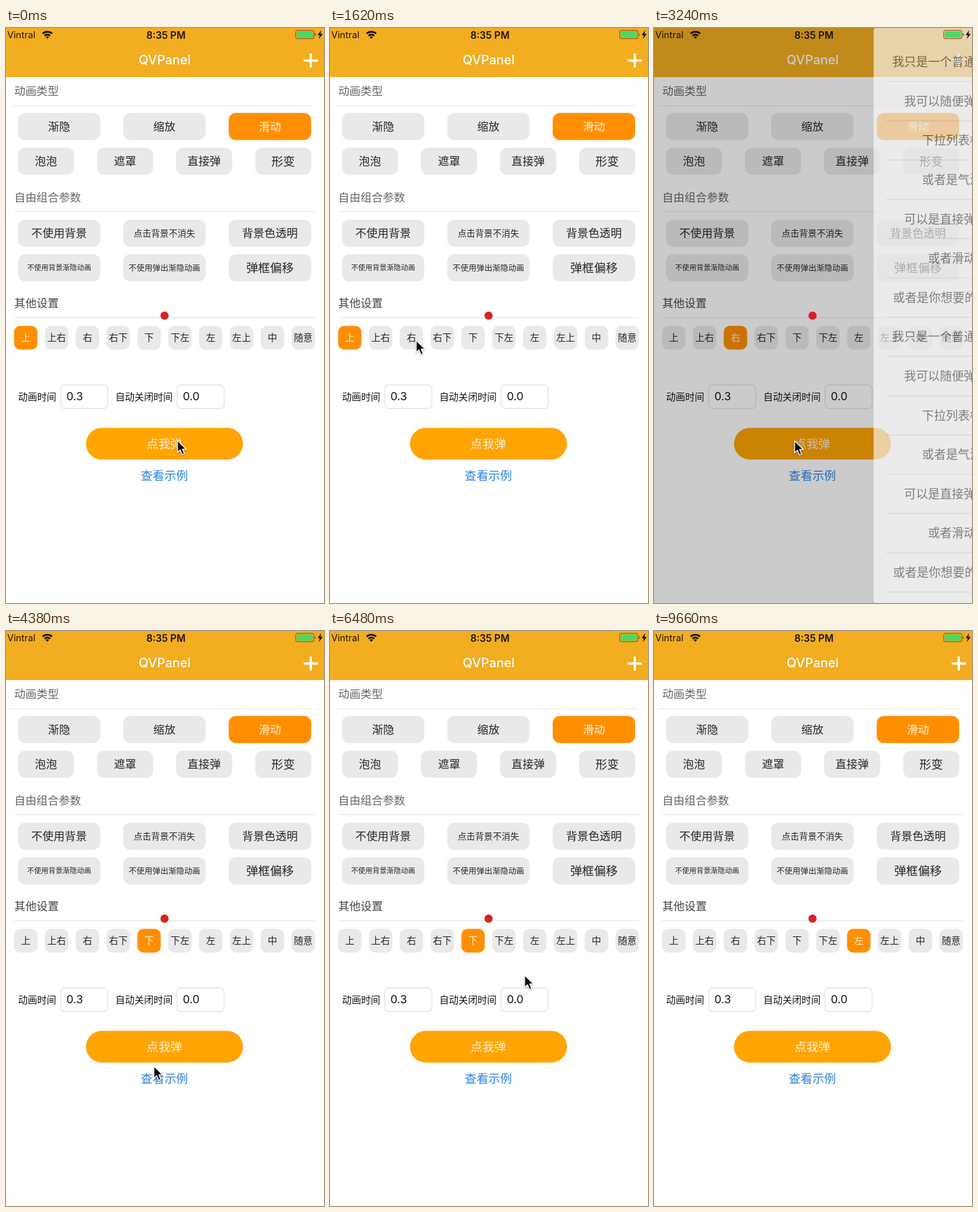
These frames come from a looping animation (500x902 px, 9720 ms). An HTML page:

```html
<!DOCTYPE html>
<html lang="zh-CN">
<head>
<meta charset="utf-8">
<title>Popup demo</title>
<style>
  html, body { margin: 0; width: 100%; height: 100%; overflow: hidden; background: #fff; }
  svg { display: block; width: 100vw; height: 100vh; }
  text { font-family: Inter, "Noto Sans CJK SC", "Noto Sans CJK", sans-serif; }
</style>
</head>
<body>
<svg id="stage" viewBox="0 0 500 902"></svg>
<script>
const LOOP = 9720, STEP = 60, W = 500, H = 902, SIDE = 246, ROW = 61.6;
const stage = document.getElementById('stage');

const rect = (x, y, w, h, r, fill, more = '') =>
  `<rect x="${x}" y="${y}" width="${w}" height="${h}" rx="${r}" fill="${fill}" ${more}/>`;
const label = (s, x, cy, size, fill, anchor = 'middle', more = '') =>
  `<text x="${x}" y="${cy + size * 0.37}" font-size="${size}" fill="${fill}" text-anchor="${anchor}" ${more}>${s}</text>`;
const rule = (x1, x2, y, color = '#e2e2e2') =>
  `<path d="M${x1} ${y}H${x2}" stroke="${color}" stroke-width="1.2"/>`;
const option = (s, x, y, w, size, on) =>
  rect(x, y, w, 42.6, 11.5, on ? '#ff8f00' : '#e9e9e9') +
  label(s, x + w / 2, y + 21.3, size, on ? '#fff1dc' : '#262626');
const field = (s, x) =>
  rect(x, 559.8, 74, 37, 6, '#fff', 'stroke="#dedede" stroke-width="1.2"') +
  label(s, x + 9, 578, 17.5, '#111', 'start');

const spots = ['上', '上右', '右', '右下', '下', '下左', '左', '左上', '中', '随意'];
const rows = ['我只是一个普通的列表', '我可以随便弹出来', '下拉列表框', '或者是气泡',
  '可以是直接弹出来', '或者滑动', '或者是你想要的任何…'];

function page() {
  const spot = (s, i) => {
    const x = 12.7 + i * 48.47;
    return `<g class="spot">${rect(x, 467.2, 36.8, 37.2, 9.5, '#e9e9e9')}${label(s, x + 18.4, 486, 14.8, '#262626')}</g>`;
  };
  return rect(0, 0, W, H, 0, '#fff') +
    rect(0, 0, W, 77, 0, '#f2ad20') +
    label('QVPanel', 249.5, 50, 20, '#fff', 'middle', 'font-weight="500"') +
    '<path d="M468 51H490.5M479.2 40V62" stroke="#fff" stroke-width="3.6"/>' +
    label('动画类型', 13, 99, 17.5, '#666', 'start') + rule(7, 480, 122) +
    option('渐隐', 18.7, 133.2, 129.6, 17.5) +
    option('缩放', 184.2, 133.2, 129.6, 17.5) +
    option('滑动', 350.2, 133.2, 129.6, 17.5, true) +
    option('泡泡', 18.7, 187.7, 88.3, 17.5) +
    option('遮罩', 143, 187.7, 88.3, 17.5) +
    option('直接弹', 267.3, 187.7, 88.3, 17.4) +
    option('形变', 391.7, 187.7, 88.3, 18.6) +
    label('自由组合参数', 13, 265.5, 17.5, '#666', 'start') + rule(13, 486, 288) +
    option('不使用背景', 18.7, 300.7, 129.6, 17.5) +
    option('点击背景不消失', 184.2, 300.7, 129.6, 13.8) +
    option('背景色透明', 350.2, 300.7, 129.6, 17.5) +
    option('不使用背景渐隐动画', 18.7, 354.9, 129.6, 11.2) +
    option('不使用弹出渐隐动画', 184.2, 354.9, 129.6, 12.5) +
    option('弹框偏移', 350.2, 354.9, 129.6, 18.7) +
    label('其他设置', 13, 432, 17.5, '#444', 'start') + rule(13, 486, 454.5) +
    spots.map(spot).join('') +
    label('动画时间', 19, 578.5, 15, '#111', 'start') + field('0.3', 86) +
    label('自动关闭时间', 172, 578.5, 15, '#111', 'start') + field('0.0', 269) +
    rect(125.8, 627.2, 246.8, 49.8, 24.9, '#ffa402') +
    label('点我弹', 249, 652, 18.6, '#fff0d8') +
    label('查看示例', 249, 702, 18.6, '#2b82e0');
}

function list(id, w, h, top) {
  let s = rect(0, 0, w, h, 4, '#fff');
  for (let i = 0; top + i * ROW < h; i++) {
    const y = top + i * ROW;
    if (y + 40 < h) s += label(rows[i % 7], w / 2, y + ROW / 2, 18.8, '#505050');
    if (y + ROW < h) s += rule(20, w, y + ROW, '#dcdcdc');
  }
  return `<g id="${id}" visibility="hidden">${s}</g>`;
}

const status =
  label('Vintral', 2, 11, 14.6, '#1a1408', 'start') +
  '<g fill="none" stroke="#111" stroke-width="2.7"><path d="M57.5 8.8a11 11 0 0 1 15 0"/><path d="M60.6 12.2a6.4 6.4 0 0 1 8.8 0"/></g>' +
  '<path d="M62.4 14.2a4 4 0 0 1 5.2 0L65 17z" fill="#111"/>' +
  label('8:35 PM', 251.5, 11, 15.3, '#1a1408', 'middle', 'font-weight="600"') +
  rect(455.5, 3.7, 28.5, 13, 3, 'none', 'stroke="#a5562c" stroke-width="1.2"') +
  rect(457, 5.2, 25.5, 10, 1.8, '#4cd964') +
  '<path d="M485.5 8v4.5q2-.6 2-2.2t-2-2.3z" fill="#a5562c"/>' +
  '<path d="M495.5 3.5L490 11.2H493.4L491.8 17.2L498 9.2H494.4z" fill="#111"/>';

const pointer = '<path id="pointer" d="M0 0V19L4.4 15L7.6 22.3L11 20.8L7.9 13.8H14z" ' +
  'fill="#0c0c0c" stroke="#fff" stroke-width="1.4" stroke-linejoin="round" ' +
  'style="filter:drop-shadow(0 1px 1.2px rgba(0,0,0,.35))"/>';

stage.innerHTML = page() +
  rect(0, 0, W, H, 0, '#000', 'id="dim" opacity="0"') +
  list('top', W, SIDE, 22.4) + list('right', SIDE, H, 22.4) +
  list('bottom', W, SIDE, 0) + list('left', SIDE, H, 22.4) +
  status + '<circle cx="249.3" cy="451.2" r="6.4" fill="#d92024"/>' + pointer;

const get = id => document.getElementById(id);
const pills = [...stage.querySelectorAll('.spot')];

// open and close are start times; dx, dy point toward the hidden side
const popups = [
  { id: 'top', open: 75, close: 1050, x: 0, y: 0, dx: 0, dy: -SIDE },
  { id: 'right', open: 2190, close: 3116, x: W - SIDE, y: 0, dx: SIDE, dy: 0 },
  { id: 'bottom', open: 4640, close: 5640, x: 0, y: H - SIDE, dx: 0, dy: SIDE },
  { id: 'left', open: 7290, close: 8192, x: 0, y: 0, dx: -SIDE, dy: 0 }
].map(p => ({ ...p, el: get(p.id) }));

const picks = [[0, 0], [1710, 2], [3780, 4], [6750, 6]];
const path = [
  [0, 269.5, 647], [1140, 269.5, 647], [1560, 135.5, 490], [1740, 135.5, 490],
  [2130, 221, 647.5], [3360, 221, 647.5], [3690, 225, 488], [3840, 225, 488],
  [4380, 232.5, 682.5], [4560, 240, 652], [4980, 240, 652], [5460, 300, 545],
  [6480, 306, 540], [6660, 322, 486], [6810, 322, 486],
  [7200, 291, 650], [8700, 291, 650], [9540, 300, 912], [LOOP, 300, 912]
];

const clamp = v => Math.max(0, Math.min(1, v));
const smooth = u => u * u * (3 - 2 * u);
const ramp = (t, start) => smooth(clamp((t - start) / 300));

function pointerAt(t) {
  const i = path.findIndex(k => k[0] > t);
  const a = path[i - 1], b = path[i];
  const u = smooth((t - a[0]) / (b[0] - a[0]));
  return [a[1] + (b[1] - a[1]) * u, a[2] + (b[2] - a[2]) * u];
}

function draw(t) {
  let shade = 0;
  for (const p of popups) {
    const k = ramp(t, p.open) - ramp(t, p.close);
    shade = Math.max(shade, k);
    p.el.setAttribute('visibility', k > 0 ? 'visible' : 'hidden');
    p.el.setAttribute('opacity', k > 0.95 ? 1 : k);
    p.el.setAttribute('transform', `translate(${p.x + p.dx * (1 - k)} ${p.y + p.dy * (1 - k)})`);
  }
  get('dim').setAttribute('opacity', 0.325 * shade);
  const pick = picks.filter(e => e[0] <= t).pop()[1];
  pills.forEach((g, i) => {
    g.children[0].setAttribute('fill', i === pick ? '#ff8f00' : '#e9e9e9');
    g.children[1].setAttribute('fill', i === pick ? '#fff1dc' : '#262626');
  });
  get('pointer').setAttribute('transform', `translate(${pointerAt(t).join(' ')})`);
}

const begin = performance.now();
function tick() {
  const t = (performance.now() - begin) % LOOP;
  draw(Math.floor(t / STEP) * STEP);
  requestAnimationFrame(tick);
}
tick();
</script>
</body>
</html>
```
